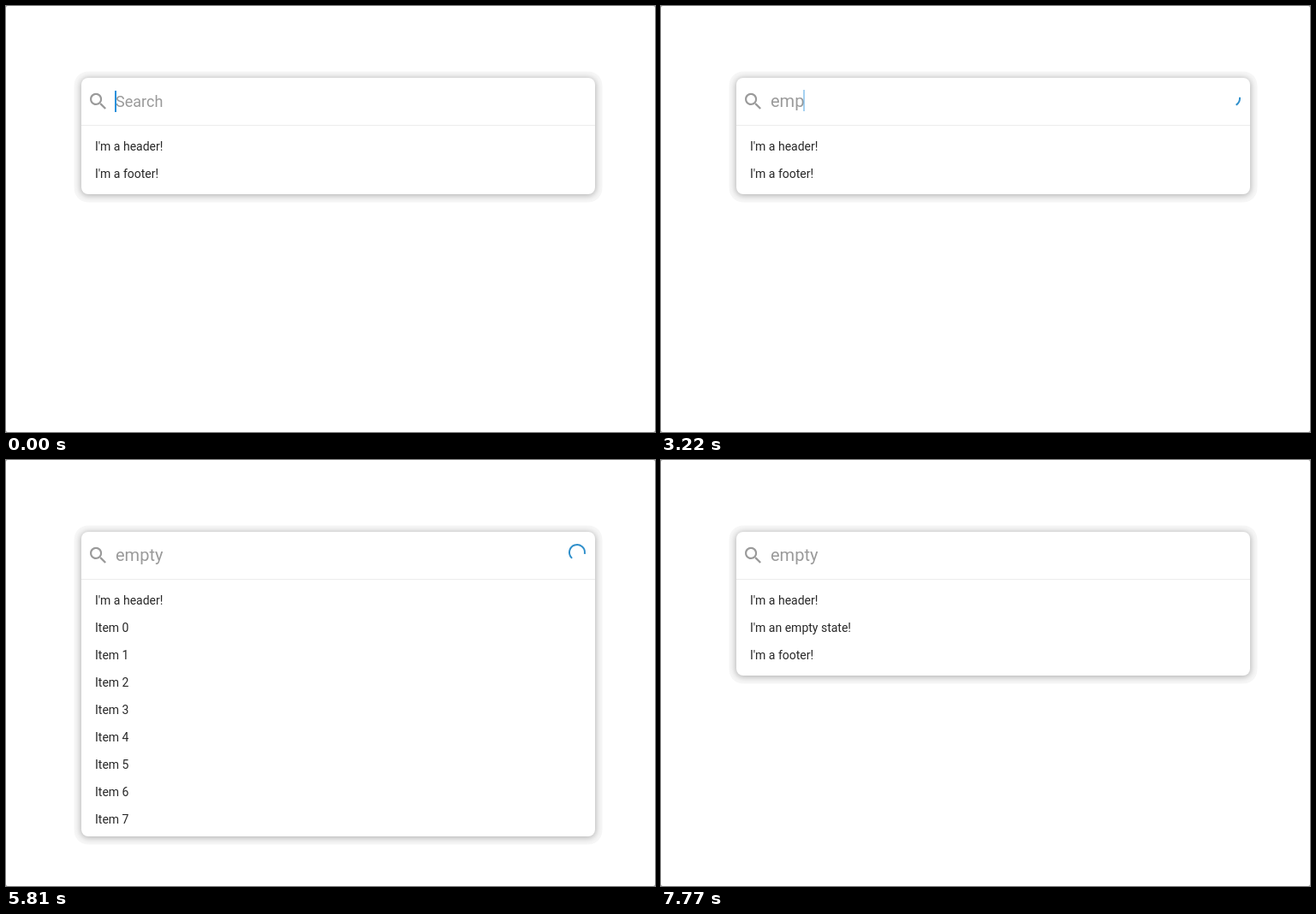
Write an HTML page that moves like this. It is 758 px wide and 498 px high and loops after 7980 ms.

```html
<!DOCTYPE html>
<html lang="en">
<head>
<meta charset="utf-8">
<title>Search bar</title>
<style>
html, body { margin: 0; width: 100%; height: 100%; overflow: hidden; background: #999; }
#stage {
  position: absolute; left: 0; top: 0; width: 758px; height: 498px;
  background: #fff; border-radius: 2px; overflow: hidden;
  font-family: Roboto, Arial, sans-serif; white-space: pre;
}
#card {
  position: absolute; left: 88px; top: 84px; width: 600px; height: 136px;
  background: #fff; border-radius: 8px;
  box-shadow: 0 1px 7px 1px rgba(0, 0, 0, .27), 0 1px 0 8.5px #f7f7f7;
}
#line { position: absolute; left: 0; top: 55px; width: 600px; height: 1px; background: #ececec; }
#view {
  position: absolute; left: 0; top: 56px; bottom: 0; width: 600px;
  overflow: hidden; border-radius: 0 0 8px 8px;
}
#list { padding: 8px 16px; font-size: 14px; line-height: 32px; color: #282828; }
#hint, #field { position: absolute; left: 128px; color: #9a9a9a; line-height: 24px; }
#hint { top: 100px; font-size: 18px; }
#field { top: 99px; font-size: 20px; height: 24px; }
#cursor { position: absolute; left: 100%; margin-left: -1px; width: 2px; height: 25px; background: #2590dc; }
svg { position: absolute; left: 0; top: 0; }
</style>
</head>
<body>
<div id="stage">
  <div id="card">
    <div id="line"></div>
    <div id="view"><div id="list"></div></div>
  </div>
  <div id="hint">Search</div>
  <div id="field"><span id="typed"></span><i id="cursor"></i></div>
  <svg width="758" height="498">
    <path fill="#9a9a9a" transform="translate(94.8 98.6) scale(1.083)" d="M15.5 14h-.79l-.28-.27C15.41 12.59 16 11.11 16 9.5 16 5.91 13.09 3 9.5 3S3 5.91 3 9.5 5.91 16 9.5 16c1.61 0 3.09-.59 4.23-1.57l.27.28v.79l5 4.99L20.49 19l-4.99-5zm-6 0C7.01 14 5 11.99 5 9.5S7.01 5 9.5 5 14 7.01 14 9.5 11.99 14 9.5 14z"/>
    <path id="spinner" fill="none" stroke="#2f8fcb" stroke-width="2" stroke-linecap="square"/>
  </svg>
</div>
<script>
const LOOP = 7980, STEP = 70, SLOW = 1.05;
const BLINK = 525, FADE = 262, RESIZE = 525;
const $ = id => document.getElementById(id);
const clamp = x => Math.min(1, Math.max(0, x));

// Cubic bezier easing, solved by bisection
function bezier(x1, y1, x2, y2) {
  const at = (a, b, u) => 3 * a * u * (1 - u) ** 2 + 3 * b * u * u * (1 - u) + u ** 3;
  return x => {
    if (x <= 0 || x >= 1) return clamp(x);
    let lo = 0, hi = 1;
    for (let i = 0; i < 24; i++) {
      const mid = (lo + hi) / 2;
      if (at(x1, x2, mid) < x) lo = mid; else hi = mid;
    }
    return at(y1, y2, lo);
  };
}
const easeOut = bezier(0, 0, .58, 1);
const fastOutSlowIn = bezier(.4, 0, .2, 1);

const header = "I'm a header!", footer = "I'm a footer!";
const items = Array.from({ length: 8 }, (_, i) => "Item " + i);
const panels = [
  { from: 0, height: 80, rows: [header, footer] },
  { from: 3223, height: 300, rows: [header, ...items] },
  { from: 6044, height: 112, rows: [header, "I'm an empty state!", footer] }
];
const keys = [[0, ""], [1680, "e"], [1890, "em"], [1960, "emp"], [4550, "empt"], [4760, "empty"]];
const loads = [[2156, 3223], [4962, 6044]];
// Each run: start of the solid cursor, first fade-out
const blinks = [[0, 40], [1680, 2623], [4550, 5410]];

function cursorAlpha(t) {
  const first = blinks.findLast(b => t >= b[0])[1];
  if (t < first) return 1;
  const n = Math.floor((t - first) / BLINK);
  const p = easeOut(clamp((t - first - n * BLINK) / FADE));
  return n % 2 ? p : 1 - p;
}

function spinnerPath(ms) {
  const cycle = ms / 1333 % 1;
  const head = fastOutSlowIn(clamp(cycle * 2));
  const tail = fastOutSlowIn(clamp(cycle * 2 - 1));
  const start = (-90 + tail * 270 + ms / 2222 * 360 + cycle * 90) * Math.PI / 180;
  const sweep = Math.max((head - tail) * 1.5 * Math.PI, .002);
  const point = a => (667 + 9 * Math.cos(a)).toFixed(3) + " " + (108 + 9 * Math.sin(a)).toFixed(3);
  return `M${point(start)}A9 9 0 ${sweep > Math.PI ? 1 : 0} 1 ${point(start + sweep)}`;
}

function draw(time) {
  const t = Math.floor(time % LOOP / STEP) * STEP;

  const text = keys.findLast(k => t >= k[0])[1];
  $("typed").textContent = text;
  $("hint").style.opacity = text ? clamp((1820 - t) / 180) : 1;
  $("cursor").style.top = text ? "-1px" : "0";
  $("cursor").style.opacity = cursorAlpha(t);

  const load = loads.find(l => t >= l[0] && t < l[1]);
  $("spinner").setAttribute("d", load ? spinnerPath((t - load[0]) / SLOW) : "");

  // The new rows stay centred in the panel while it resizes
  const i = panels.findLastIndex(p => t >= p.from);
  const now = panels[i], last = panels[i - 1] || now;
  const h = last.height + (now.height - last.height) * clamp((t - now.from) / RESIZE);
  $("card").style.height = 56 + h + "px";
  $("list").textContent = now.rows.join("\n");
  $("list").style.transform = `translateY(${(h - now.height) / 2}px)`;
}

const begin = performance.now();
function tick() {
  draw(performance.now() - begin);
  requestAnimationFrame(tick);
}
tick();
</script>
</body>
</html>
```
